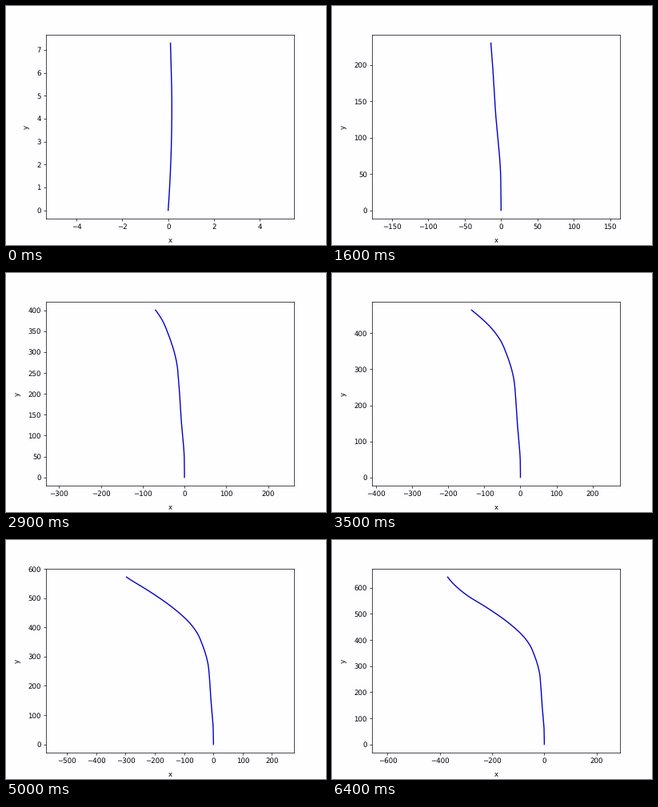
Animation of 400x299 px, one loop 6.5 s. Source, as a matplotlib script:

```python
import numpy as np
import matplotlib.pyplot as plt
from matplotlib.animation import FuncAnimation

DPI = 62.5
FRAMES = 65
INTERVAL = 100
PAPER = "#fefdff"
BLUE = "#0400c4"

# Key points of the path: the curve bends left as it climbs.
PATH_Y = [0, 4.7, 7.3, 50, 133, 208, 283, 339, 382, 412, 464.5, 528, 567, 641]
PATH_X = [0, 0.16, 0.1, -0.5, -7.3, -12.2, -20.2, -37.2, -56.4, -78.5, -135.5,
          -226.5, -290, -370]

# Height of the tip over the frames, slowing towards the end.
TIP_FRAME = [0, 8, 24, 35, 44, 55, 64]
TIP_Y = [7.3, 116.2, 339, 464.5, 528, 604, 641]


def spline(t, keys, values):
    """Smooth cubic curve through the key values."""
    k, v = np.array(keys, float), np.array(values, float)
    slope = np.gradient(v, k, edge_order=2)
    i = np.clip(np.searchsorted(k, t, side="right") - 1, 0, len(k) - 2)
    h = k[i + 1] - k[i]
    u = (t - k[i]) / h
    ease = u * u * (3 - 2 * u)
    return (v[i] + (v[i + 1] - v[i]) * ease
            + h * u * (1 - u) * ((1 - u) * slope[i] - u * slope[i + 1]))


plt.rcParams.update({
    "text.hinting": "none",
    "axes.labelpad": 9.7,
    "axes.facecolor": PAPER,
    "figure.facecolor": PAPER,
})
fig, ax = plt.subplots(figsize=(400 / DPI, 299 / DPI), dpi=DPI)


def draw(i):
    y = np.linspace(0, spline(i, TIP_FRAME, TIP_Y), 150)
    ax.clear()
    ax.plot(spline(y, PATH_Y, PATH_X), y, color=BLUE, lw=1.6)
    ax.set_xlabel("x")
    ax.set_ylabel("y")
    ax.axis("equal")


anim = FuncAnimation(fig, draw, frames=FRAMES, interval=INTERVAL,
                     init_func=lambda: draw(0), repeat=True, repeat_delay=0)
plt.show()
```
